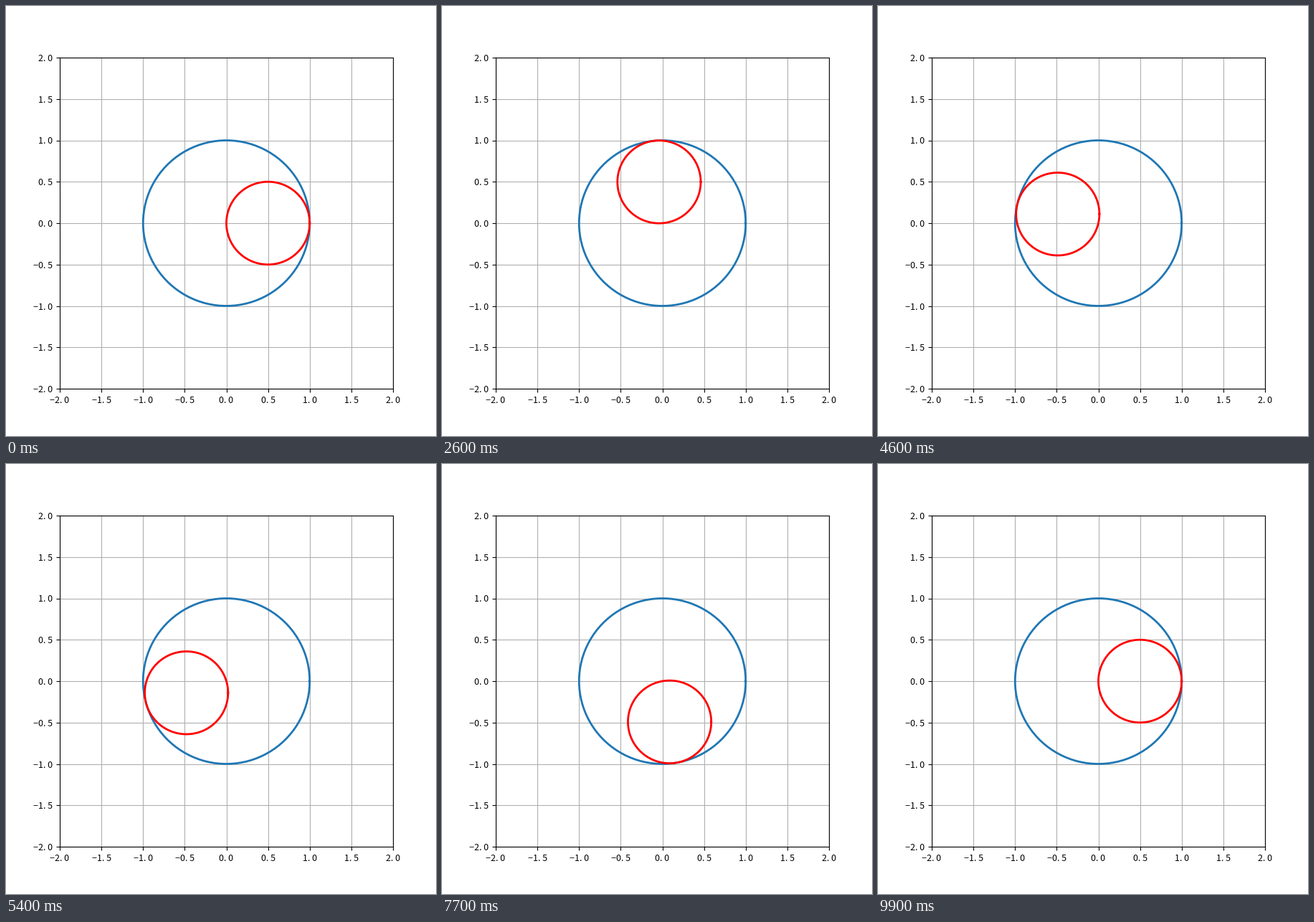
A matplotlib script for the animation above (10000 ms loop, 600 px wide and 600 px high).

```python
import numpy as np
import matplotlib.pyplot as plt
from matplotlib.animation import FuncAnimation

FRAMES = 100
INTERVAL = 100

plt.rcParams["font.family"] = "Noto Sans CJK JP"
plt.rcParams["font.size"] = 9


def tick_text(value, _pos):
    """One decimal, with a wide gap after the point."""
    return f"{value:.1f}".replace(".", ". ").replace("-", "\u2212")


theta = np.linspace(0, 2 * np.pi, 100)
cos, sin = np.cos(theta), np.sin(theta)
angles = np.linspace(0, 2 * np.pi, FRAMES)

fig, ax = plt.subplots(figsize=(6, 6), dpi=100)
ax.set(xlim=(-2, 2), ylim=(-2, 2))
for axis in (ax.xaxis, ax.yaxis):
    axis.set_ticks(np.arange(-2, 2.1, 0.5))
    axis.set_major_formatter(tick_text)
ax.grid(True)

ax.plot(cos, sin, color="tab:blue", lw=2)
inner, = ax.plot([], [], color="red", lw=2)


def update(i):
    a = angles[i]
    inner.set_data(0.5 * (np.cos(a) + cos), 0.5 * (np.sin(a) + sin))
    return inner,


anim = FuncAnimation(fig, update, frames=FRAMES, interval=INTERVAL,
                     repeat=True, repeat_delay=0)
plt.show()
```
